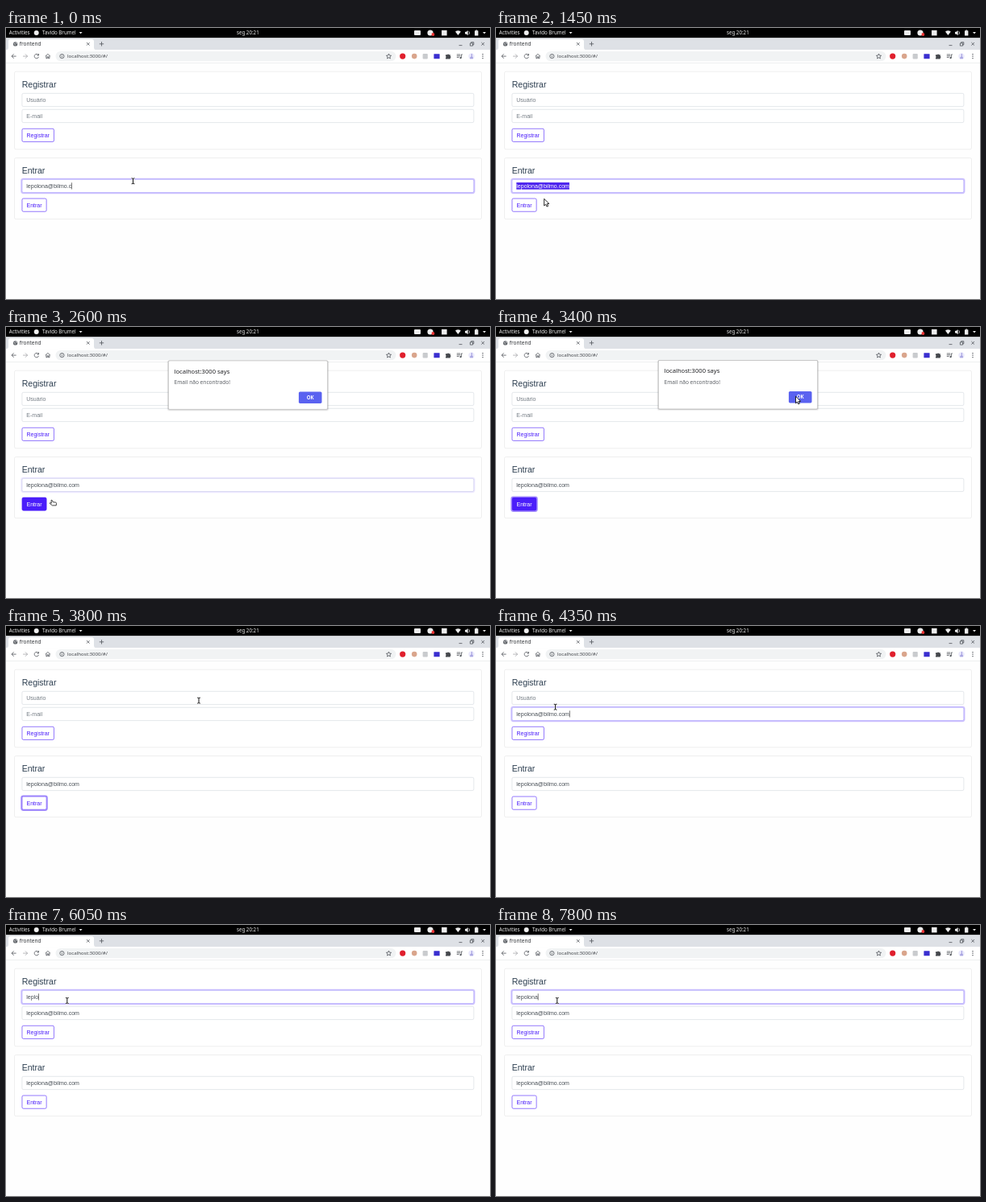
Animation of 600 by 337 pixels, one loop 8 s. Source, as an HTML page:

```html
<!DOCTYPE html>
<html lang="pt">
<head>
<meta charset="utf-8">
<title>frontend</title>
<style>
html, body { margin: 0; width: 100%; height: 100%; overflow: hidden; background: #fefefe; }
svg { display: block; width: 100%; height: 100%; }
text { white-space: pre; }
.ui { font-family: "Noto Sans", "Open Sans", sans-serif; }
.page { font-family: "Liberation Sans", Arial, sans-serif; font-size: 7.03px; }
.line { fill: none; stroke: #50545a; stroke-width: .8; }
.white { fill: none; stroke: #eee; stroke-width: .8; }
</style>
</head>
<body>
<svg id="stage" viewBox="0 0 600 337" preserveAspectRatio="none">
  <rect width="600" height="337" fill="#fefefe"/>

  <g class="ui" font-size="6.2">
    <rect width="600" height="12.4" fill="#000"/>
    <g fill="#eee">
      <text x="3.8" y="8.2">Activities</text>
      <circle cx="37.7" cy="6" r="3"/>
      <text x="45" y="8.2">Tavido Brumel</text>
      <path d="M90.6 4.9h4l-2 2.4z"/>
      <text x="286" y="8.2">seg 20:21</text>
      <rect x="506" y="3" width="8" height="6" rx="1"/>
      <circle cx="526" cy="6" r="3.6"/>
      <circle cx="529.4" cy="8" r="1.9" fill="#e33"/>
      <rect x="540" y="2.8" width="6.6" height="6.6"/>
      <path d="M557 4.6q3.4-2.8 6.8 0l-3.4 4.4z"/>
      <path d="M569 4.8h1.6l2-1.9v6.4l-2-1.9H569z"/>
      <path class="white" d="M573.8 4.2q1.6 1.9 0 3.8"/>
      <rect x="581" y="3.2" width="4.4" height="6.4" rx=".6"/>
      <path d="M582.2 2.4h2v1h-2zM591 4.9h4l-2 2.4z"/>
    </g>

    <rect y="12.4" width="600" height="14.8" fill="#dee1e6"/>
    <path d="M0 27.2q3 0 3-3V16.6q0-2.6 2.6-2.6H106.400q2.600 0 2.600 2.600V24.200q0 3 3 3z" fill="#fff"/>
    <circle cx="11.600" cy="19.900" r="2.700" fill="#62666b"/>
    <path d="M9.600 19q2 .2 1.700 2.300M12 17.800q0 1.600 2 1.400" fill="none" stroke="#fff" stroke-width=".6"/>
    <text x="16.700" y="22" font-size="6.500" fill="#33363a">frontend</text>
    <path class="line" d="M100 18l3.600 3.600m0-3.600l-3.600 3.600M115.800 19.800h5.400m-2.700-2.700v5.400"/>
    <path class="line" d="M561.500 21.600h4M575.400 18.900h3.200v3.200h-3.200zM576.600 18.900v-1.200h3.200v3.200h-1.200M589.400 18l3.600 3.600m0-3.600l-3.600 3.600"/>

    <rect y="27.2" width="600" height="16" fill="#fff"/>
    <rect y="43.1" width="600" height=".5" fill="#dcdee1"/>
    <rect x="61.500" y="29" width="422" height="12.200" rx="6.100" fill="#f1f3f4"/>
    <path class="line" d="M12.600 35.100H7m2.700-2.700L7 35.100l2.700 2.700"/>
    <path class="line" d="M21 35.100h5.600m-2.700-2.700l2.700 2.700-2.700 2.700" opacity=".5"/>
    <path class="line" d="M40 33.400a2.700 2.700 0 1 0 .5 2.500M40.500 32v2.100h-2.100"/>
    <path class="line" d="M48.900 35.200l3-2.800 3 2.800M49.900 34.500v3.300h1.300v-2h1.400v2h1.300v-3.300"/>
    <circle class="line" cx="69.400" cy="35.100" r="2.600" stroke-width=".6"/>
    <path class="line" d="M69.400 34.700v1.700m0-2.900v.6" stroke-width=".6"/>
    <text x="76" y="37.300" font-size="6.130" fill="#45484d">localhost:3000/#/</text>
    <path class="line" stroke-width=".6" d="M474.500 32l.9 2.100 2.200.2-1.700 1.500.5 2.200-1.900-1.200-1.900 1.200.5-2.200-1.700-1.500 2.200-.2z"/>
    <circle cx="491.700" cy="35.100" r="3.600" fill="#e01f2d"/>
    <circle cx="506.200" cy="35.100" r="3.300" fill="#d9a58c"/>
    <rect x="516.600" y="32" width="6.200" height="6.400" rx="1" fill="#c9cbce"/>
    <rect x="530.400" y="32.200" width="7.200" height="6" rx=".5" fill="#3a2fd0"/>
    <path d="M545 33.200h2a1.200 1.200 0 0 1 2.200 0h1.600v1.700a1.200 1.200 0 0 1 0 2.200v1.500H545v-1.700a1.200 1.200 0 0 0 0-2z" fill="#45484d"/>
    <path class="line" d="M558.800 33h4.400m-4.400 1.800h4.400m-4.400 1.800h2.800M564.400 37v-4h1.600"/>
    <circle cx="563.600" cy="37.200" r="1.100" fill="#50545a"/>
    <circle cx="577" cy="35.100" r="3.700" fill="#e9e8fb"/>
    <path d="M575 38.200q0-2.500 1.800-2.800V32h1.200v3.400q1.200.4 1.200 2.800z" fill="#aaa6e2"/>
    <path d="M590.400 32h1.200v1.200h-1.200zm0 2.500h1.200v1.200h-1.200zm0 2.500h1.200v1.200h-1.200z" fill="#50545a"/>
  </g>

  <g id="page" class="page"></g>

  <g id="dialog" class="ui">
    <rect x="199.800" y="41.500" width="200.400" height="63" rx="2" fill="#000" opacity=".06"/>
    <rect x="200.600" y="41.500" width="198.800" height="62" rx="2" fill="#000" opacity=".13"/>
    <rect x="201.400" y="42" width="197.200" height="60.400" rx="1.500" fill="#fff" stroke="#999" stroke-width=".4"/>
    <text x="208.500" y="57.600" font-size="7.600" fill="#202124">localhost:3000 says</text>
    <text x="208.500" y="71.300" font-size="6.600" fill="#5f6368">Email não encontrado!</text>
    <rect x="362.900" y="80.500" width="28.600" height="14.400" rx="1.600" fill="#5a62f0"/>
    <text x="377.200" y="89.900" font-size="6.100" font-weight="700" fill="#fff" text-anchor="middle">OK</text>
  </g>

  <g id="pointer" stroke-linejoin="round">
    <path d="M0 0V8.600L2 6.800 3.300 9.700 4.900 9 3.600 6.200H6.300Z" fill="#fff" stroke="#111" stroke-width=".9"/>
    <path d="M0 0q1-.7 1.500.4l.7 1.800 3.300.4q1 .2 1 1.300l-.3 2.500H1.400L-1.600 4q-.3-1.200 1-.8l.9.500z" fill="#fff" stroke="#111" stroke-width=".8"/>
    <g fill="none"><path d="M-1.800-3.500Q0-3.500 0-2.700 0-3.500 1.800-3.500M0-2.900V2.900M-1.800 3.500Q0 3.500 0 2.700 0 3.500 1.800 3.500" stroke="#fff" stroke-width="1.900"/>
    <path d="M-1.800-3.500Q0-3.500 0-2.700 0-3.500 1.800-3.500M0-2.900V2.900M-1.800 3.500Q0 3.500 0 2.700 0 3.500 1.800 3.500" stroke="#111" stroke-width="1"/></g>
  </g>
</svg>
<script>
const LOOP = 8000, PRIMARY = [75, 30, 250];
const NAME = 'lepolona', MAIL = NAME + '@bilmo.com';
const $ = id => document.getElementById(id);
const page = $('page');

function add(tag, attrs, text = '', parent = page) {
  const el = document.createElementNS(page.namespaceURI, tag);
  set(el, attrs);
  el.textContent = text;
  return parent.appendChild(el);
}
function set(el, attrs) {
  for (const k in attrs) el.setAttribute(k, attrs[k]);
}
const rgb = c => `rgb(${c.map(Math.round)})`;
const mix = (a, b, k) => rgb(a.map((v, i) => v + (b[i] - v) * k));
const ramp = (t, a, b) => Math.min(1, Math.max(0, (t - a) / (b - a)));
const within = (t, a, b) => t >= a && t < b;

function card(y, h, title) {
  add('rect', { x: 10.5, y, width: 579, height: h, rx: 1.8, fill: '#fff', stroke: '#dedede', 'stroke-width': .5 });
  add('text', { x: 19.7, y: y + 19.3, 'font-size': 10.54, fill: '#2c3e50' }, title);
}

function ring(x, y, w, h) {
  return add('rect', { x: x - .7, y: y - .7, width: w + 1.4, height: h + 1.4, rx: 2.4,
    fill: 'none', stroke: rgb(PRIMARY), 'stroke-width': 1.4 });
}

function field(y, hint) {
  const halo = ring(19.7, y, 560.4, 16.7);
  const box = add('rect', { x: 19.9, y: y + .2, width: 560, height: 16.3, rx: 1.7, fill: '#fff', 'stroke-width': .55 });
  const mark = add('rect', { x: 25.3, y: y + 4, height: 8.6, fill: '#4b22ee' });
  const label = add('text', { x: 25.3, y: y + 10.8 });
  const bar = add('rect', { y: y + 4.2, width: .6, height: 8.2, fill: '#222' });
  return (value, focus, caret, selected) => {
    label.textContent = value || hint;
    set(label, { fill: selected ? '#fff' : value ? '#495057' : '#747c84' });
    const w = value ? label.getComputedTextLength() : 0;
    set(halo, { opacity: .27 * focus });
    set(box, { stroke: mix([206, 212, 218], [142, 128, 252], focus) });
    set(mark, { width: selected ? w : 0 });
    set(bar, { x: 25.3 + w, opacity: caret ? 1 : 0 });
  };
}

function button(y, w, label) {
  const halo = ring(19.7, y, w, 16.7);
  const box = add('rect', { x: 19.95, y: y + .25, width: w - .5, height: 16.2, rx: 1.7, stroke: rgb(PRIMARY), 'stroke-width': .6 });
  const text = add('text', { x: 19.7 + w / 2, y: y + 10.8, 'text-anchor': 'middle' }, label);
  return (fill, focus) => {
    set(halo, { opacity: .5 * focus });
    set(box, { fill: mix([255, 255, 255], PRIMARY, fill) });
    set(text, { fill: mix(PRIMARY, [255, 255, 255], fill) });
  };
}

card(54.2, 96.6, 'Registrar');
const user = field(81.1, 'Usuário');
const mail = field(101.1, 'E-mail');
const register = button(125, 40, 'Registrar');
card(161.6, 76, 'Entrar');
const login = field(188.1, 'E-mail');
const enter = button(211.8, 30.7, 'Entrar');

// Typing a name with one slip: [time, text]
const keys = [[0, 0], [5350, 1], [5550, 2], [5650, 3], [5800, 'lepl'], [6000, 'leplo'], [6650, 'lepl'],
  [6750, 3], [6850, 4], [7200, 5], [7400, 6], [7600, 7], [7800, 8]]
  .map(([t, v]) => [t, typeof v === 'number' ? NAME.slice(0, v) : v]);
const typed = t => keys.filter(k => k[0] <= t).pop()[1];

// Pointer stops: [time, x, y]
const path = [[0, 157.5, 190.3], [1200, 157.5, 190.3], [1450, 59.7, 212.4], [1550, 59.7, 212.4],
  [1900, 44, 217], [2550, 44, 217], [2600, 56, 215.5], [2650, 57, 215], [3350, 371.5, 86.2],
  [3500, 371.5, 86.2], [4150, 73.6, 100.7], [4400, 73.6, 100.7], [4600, 75.8, 94], [LOOP, 75.8, 94]];

function pointerAt(t) {
  const i = path.findIndex((p, n) => n && t < p[0]);
  const [a, b] = [path[i - 1], path[i]];
  const k = ramp(t, a[0], b[0]), e = k * k * (3 - 2 * k);
  return [a[1] + (b[1] - a[1]) * e, a[2] + (b[2] - a[2]) * e];
}

const [arrow, hand, beam] = $('pointer').children;

function drawPointer(t, modal) {
  const [x, y] = pointerAt(t);
  const overField = within(y, 81, 118) || within(y, 188, 205);
  const overButton = within(y, 211.8, 228.5) && x < 50.4;
  const kind = modal ? (y > 102 ? hand : arrow) : overButton ? hand : overField ? beam : arrow;
  for (const c of [arrow, hand, beam]) set(c, { opacity: c === kind ? 1 : 0 });
  set($('pointer'), { transform: `translate(${x} ${y})` });
}

function draw(t) {
  const blink = within(t, 650, 750) || within(t, 5200, 5350) || within(t, 6550, 6650);
  const mailFocus = ramp(t, 4080, 4230) - ramp(t, 4580, 4730);
  // The blur fade stalls while the alert holds the page
  const loginFocus = t < 2650 ? 1 - .65 * ramp(t, 1950, 2050) : 0;
  const selected = within(t, 750, 1950);

  user(typed(t), ramp(t, 4580, 4730), t >= 4580 && !blink, false);
  mail(t >= 4350 ? MAIL : '', mailFocus, within(t, 4080, 4580), false);
  login(MAIL.slice(0, t < 150 ? -2 : t < 250 ? -1 : undefined), loginFocus, t < 750 && !blink, selected);
  register(0, 0);
  enter(ramp(t, 1730, 1880) - ramp(t, 3550, 3700), within(t, 2650, 4080) ? 1 : 0);

  const shown = ramp(t, 2100, 2300) - ramp(t, 3500, 3620);
  set($('dialog'), { opacity: shown, transform: `translate(0 ${t < 2650 ? 0 : -.5})` });
  drawPointer(t, within(t, 2100, 3560));
}

const start = performance.now();
function tick() {
  draw((performance.now() - start) % LOOP);
  requestAnimationFrame(tick);
}
tick();
</script>
</body>
</html>
```
